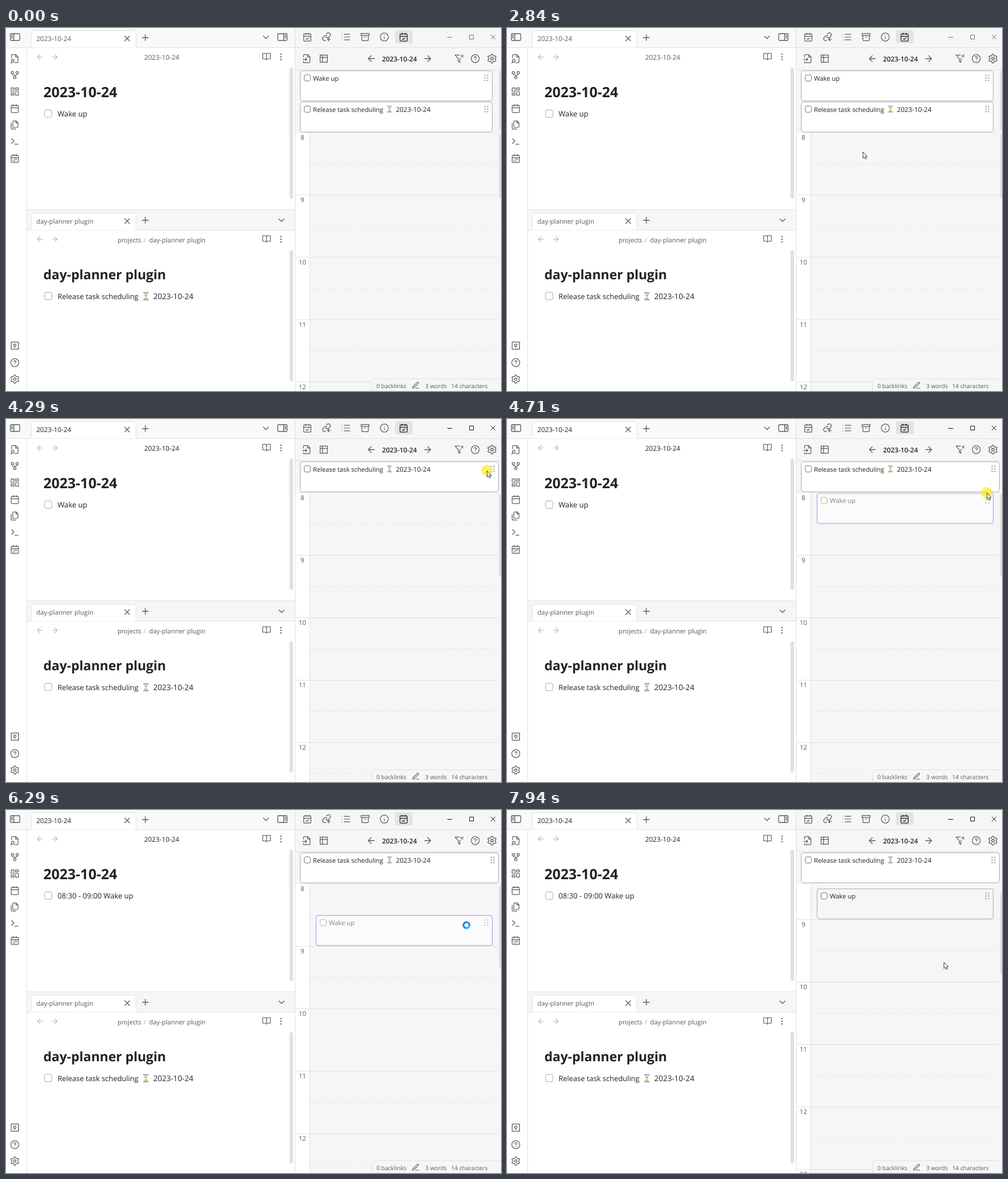
Write an HTML page that moves like this. It is 874 px wide and 640 px high and loops after 8 s.

```html
<!DOCTYPE html>
<html lang="en">
<head>
<meta charset="utf-8">
<title>Day planner</title>
<style>
html, body { margin: 0; width: 100%; height: 100%; overflow: hidden; background: #fff; }
svg { display: block; }
text { font-family: "Open Sans", "Noto Sans", sans-serif; fill: #222; text-rendering: geometricPrecision; }
text.soft { fill: #5a5a5a; }
text.faint { fill: #ababab; }
.icon { fill: none; stroke: #5a5a5a; stroke-width: 1.75; stroke-linecap: round; stroke-linejoin: round; }
.icon.dim { stroke: #b4b4b4; }
.icon.dark { stroke: #222; }
.rule { fill: none; stroke: #e0e0e0; }
.thumb { fill: #e1e1e1; }
.wake { fill: none; stroke: #707070; }
.focus .wake { stroke: #111; }
text.title { fill: #5c5c5c; }
.focus text.title { fill: #222; }
.card { fill: #fff; stroke: #ababab; }
.solid .card { fill: #f6f6f6; }
.ghost .card { fill: #fbfbfb; stroke: #a990ee; }
.ghost .body { opacity: .55; }
</style>
</head>
<body>
<svg id="stage" width="874" height="640" viewBox="0 0 874 640"></svg>
<script>
const LOOP = 8000, HOUR = 110, SNAP = HOUR / 6;

const circle = (x, y, r) => `M${x - r} ${y}a${r} ${r} 0 1 0 ${2 * r} 0a${r} ${r} 0 1 0 ${-2 * r} 0`;
const box = (x, y, w, h) => `M${x} ${y}h${w}v${h}h${-w}z`;
const gear = 'M' + Array.from({ length: 73 }, (_, i) => {
  const a = i * Math.PI / 36, r = 8.9 + 1.5 * Math.tanh(2 * Math.cos(6 * a));
  return `${(12 + r * Math.sin(a)).toFixed(2)} ${(12 - r * Math.cos(a)).toFixed(2)}`;
}).join('L') + circle(12, 12, 3);
const calendar = 'M5 4h14a2 2 0 0 1 2 2v14a2 2 0 0 1-2 2H5a2 2 0 0 1-2-2V6a2 2 0 0 1 2-2zM16 2v4M8 2v4M3 10h18';
const disc = circle(12, 12, 10);

// Icons on a 24 unit grid
const ICONS = {
  calendar, gear,
  check: calendar + 'M9 16l2 2 4-4',
  agenda: calendar + 'M7 14h.01M11 14h6M7 18h6M17 18h.01',
  search: 'M4 10V4a2 2 0 0 1 2-2h8.5L20 7.5V20a2 2 0 0 1-2 2h-6M14 2v6h6M4.5 20.5L2 23' + circle(7, 17, 3.5),
  fork: circle(12, 18, 3) + circle(6, 6, 3) + circle(18, 6, 3) + 'M18 9v1a2 2 0 0 1-2 2H8a2 2 0 0 1-2-2V9M12 12v3',
  grid: box(3, 3, 7, 9) + box(14, 3, 7, 5) + box(14, 12, 7, 9) + box(3, 16, 7, 5),
  files: 'M15.5 2H9a2 2 0 0 0-2 2v12a2 2 0 0 0 2 2h9a2 2 0 0 0 2-2V6.5zM3 7.6V20a2 2 0 0 0 2 2h9.500M15 2v5h5',
  prompt: 'M4 17l6-6-6-6M12 19h8',
  vault: box(3, 3, 18, 18) + circle(12, 11, 3) + 'M12 14v3M21 7h1.500M21 17h1.500',
  help: disc + 'M9.1 9a3 3 0 0 1 5.8 1c0 2-2.900 3-2.900 3M12 17h.01',
  info: disc + 'M12 16v-4M12 8h.01',
  book: 'M2 3h6a4 4 0 0 1 4 4v14a3 3 0 0 0-3-3H2zM22 3h-6a4 4 0 0 0-4 4v14a3 3 0 0 1 3-3h7z',
  more: circle(12, 5, 1) + circle(12, 12, 1) + circle(12, 19, 1),
  left: 'M19 12H5M12 19l-7-7 7-7',
  right: 'M5 12h14M12 5l7 7-7 7',
  close: 'M18 6L6 18M6 6l12 12',
  plus: 'M5 12h14M12 5v14',
  down: 'M6 9l6 6 6-6',
  link: 'M10 12a5 5 0 0 0 7.500.500l3-3a5 5 0 0 0-7-7l-1.700 1.700M13 9a5 5 0 0 0-6.500.500l-3 3a5 5 0 0 0 6 7.800M22 18h-7M18 14.500L14.500 18l3.500 3.500',
  list: 'M8 5h14M8 12h14M8 19h14M2 5h.01M2 12h.01M2 19h.01',
  archive: box(2, 3, 20, 5) + 'M4 8v11a2 2 0 0 0 2 2h12a2 2 0 0 0 2-2V8M10 12h4',
  input: 'M4 8V4a2 2 0 0 1 2-2h8.500L20 7.500V20a2 2 0 0 1-2 2H4v-3M14 2v6h6M2 14h10M9 11l3 3-3 3',
  table: box(3, 3, 18, 18) + 'M3 9h18M9 3v18',
  filter: 'M13 3H2l8 9.500V19l4 2v-8.500l1-1.100M22 3l-5 5M17 3l5 5',
  pencil: 'M12 20h9M16.500 3.500a2.100 2.100 0 0 1 3 3L7 19l-4 1 1-4z',
  panelLeft: 'M3 4h18a2 2 0 0 1 2 2v12a2 2 0 0 1-2 2H3a2 2 0 0 1-2-2V6a2 2 0 0 1 2-2zM9 4v16M4 8h2M4 11h2M4 14h2',
  panelRight: 'M3 4h18a2 2 0 0 1 2 2v12a2 2 0 0 1-2 2H3a2 2 0 0 1-2-2V6a2 2 0 0 1 2-2zM15 4v16M18 8h2M18 11h2M18 14h2',
};

const icon = (name, x, y, size = 17, cls = '') =>
  `<path class="icon ${cls}" d="${ICONS[name]}" transform="translate(${x - size / 2} ${y - size / 2}) scale(${size / 24})"/>`;
const text = (str, x, y, size, attrs = '') => `<text x="${x}" y="${y}" font-size="${size}" ${attrs}>${str}</text>`;
const rect = (x, y, w, h, attrs = '') => `<rect x="${x}" y="${y}" width="${w}" height="${h}" ${attrs}/>`;
const rule = (d, attrs = '') => `<path class="rule" d="${d}" ${attrs}/>`;
const SOFT = 'class="soft"', BOLD = 'font-weight="700"';

const hourglass = (x, y, k) => `<g transform="translate(${x} ${y}) scale(${k})">
  <path d="M-4-6H4V-4L1 0 4 4V6H-4V4L-1 0-4-4z" fill="#cfe3ee"/>
  <path d="M-3-3H3L0 1zM-3.500 5L0 2 3.500 5z" fill="#f2a93b"/>
  <path d="M-5-6.500H5M-5 6.500H5" stroke="#7793a3" stroke-width="1.600"/></g>`;

const checkbox = (x, y, s, color) => rect(x - s / 2, y - s / 2, s, s, `rx="3" fill="#fff" stroke="${color}"`);

const handle = (x, y) => [-4.5, 0, 4.5].map(dy => [-2.4, 2.4].map(dx =>
  `<circle cx="${x + dx}" cy="${y + dy}" r="1.300" fill="#a5a5a5"/>`).join('')).join('');

const release = (x, y) => text('Release task scheduling', x, y, 11.22) +
  hourglass(x + 135, y - 4.5, .8) + text('2023-10-24', x + 146.5, y, 11.7);

const card = (x, y, right, body) => rect(x, y, right - x, 53, 'class="card" rx="4"') +
  `<g class="body">${checkbox(x + 12.5, y + 12.5, 11, '#707070')}${body(x + 22.5, y + 17)}${handle(right - 10.5, y + 12.5)}</g>`;
const wakeUp = (x, y) => text('Wake up', x, y, 11.35);

const tab = (y, label, size, cls) =>
  `<path class="rule" style="fill:#fff" d="M37 ${y + 30}h3q4.500 0 4.500-4.500V${y + 6}q0-6 6-6h173q6 0 6 6V${y + 25.5}q0 4.500 4.500 4.500"/>` +
  text(label, 53.5, y + 18.5, size, `class="${cls}"`) +
  icon('close', 214, y + 14, 17) + icon('plus', 246, y + 12.5, 18);

const paneHeader = y => icon('left', 60, y, 15, 'dim') + icon('right', 86, y, 15, 'dim') +
  icon('book', 460, y - .5, 16) + icon('more', 485.5, y, 16);

const ribbon = { search: 54, fork: 83, grid: 112, calendar: 142, files: 171, prompt: 200, agenda: 230, vault: 560, help: 590, gear: 619 };

const leftSide =
  rect(0, 0, 510, 34, 'fill="#f9f9f9"') + rect(37, 321, 473, 35, 'fill="#f6f6f6"') +
  rule('M0 34.500H510M36.500 34V640M37 320.500H510M37 356.500H510') +
  icon('panelLeft', 16, 16, 18) + icon('down', 459, 16.5, 18) + icon('panelRight', 488, 16, 18) +
  Object.entries(ribbon).map(([name, y]) => icon(name, 15.5, y)).join('') +
  tab(4.5, '2023-10-24', 11.8, 'title') + paneHeader(51) +
  text('2023-10-24', 244, 55.5, 11.85, 'class="title"') +
  text('2023-10-24', 66, 121.5, 25, BOLD) +
  checkbox(74.5, 151, 13, '#ababab') + text('', 91, 156, 13.1, 'id="entry"') +
  rect(500.5, 70, 6.5, 231, 'class="thumb" rx="2"') +
  tab(326.5, 'day-planner plugin', 11.46, 'soft') + icon('down', 486.5, 339, 18) + paneHeader(372.5) +
  text('projects', 197, 378, 11.25, SOFT) + text('/', 243, 378, 11.4, 'class="faint"') +
  text('day-planner plugin', 252.5, 378, 11.4, SOFT) +
  text('day-planner plugin', 66, 443, 23, BOLD) +
  checkbox(74.5, 472.5, 13, '#ababab') + text('Release task scheduling', 91, 477.5, 12.95) +
  hourglass(247, 473, .95) + text('2023-10-24', 260, 477.5, 13.55) +
  rect(500.5, 392, 6.5, 231, 'class="thumb" rx="2"');

const toolbar = ['check', 'link', 'list', 'archive', 'info'].map((name, i) => icon(name, 532 + 34 * i, 16)).join('');

const rightSide =
  rect(510, 0, 364, 640, 'fill="#f6f6f6"') + rule('M511 34.500H874M511 73.500H874') +
  toolbar + rect(687, 4, 31, 23, 'rx="4" fill="#e3e3e3"') + icon('check', 702, 16, 17, 'dark') +
  '<path class="wake" d="M779 16.500h9M818.500 12.500h7v7h-7zM856 12l8 8M864 12l-8 8"/>' +
  icon('input', 531, 54) + icon('table', 561, 54) + icon('left', 645, 54, 18) + icon('right', 744.5, 54, 18) +
  text('2023-10-24', 664, 58.5, 11.8, 'font-weight="600"') +
  icon('filter', 800, 54) + icon('help', 828.5, 54) + icon('gear', 858, 54, 18) +
  `<g id="before">${card(519.5, 75.5, 858.5, wakeUp)}${card(519.5, 130.5, 858.5, release)}${rect(870.5, 76, 4, 104, 'class="thumb" rx="1"')}</g>` +
  `<g id="after">${card(519.5, 75.5, 869.5, release)}</g>`;

const hours = [8, 9, 10, 11, 12, 13].map((h, i) => {
  const y = i * HOUR;
  return rule(`M511 ${y}H869`) + rule(`M537 ${y + HOUR / 2}H869`, 'stroke-dasharray="2 2"') +
    text(h, 523.3, y + 12.5, 11.5, 'class="soft" text-anchor="middle"');
}).join('');

const lane = `<svg id="lane" width="874" height="640">${rect(511, 0, 25.5, 640, 'fill="#fff"')}
  <g id="scroll">${hours}<g id="block">${card(547.5, .5, 858.5, wakeUp)}</g></g>
  ${rule('M536.500 0V640')}${rect(870.5, 2.5, 4, 144, 'class="thumb" id="thumb" rx="1"')}</svg>`;

const statusBar =
  '<path class="rule" style="fill:#f6f6f6" d="M645.500 641V626.500q0-8 8-8H875V641z"/>' +
  text('0 backlinks', 654, 634.5, 10.35, SOFT) + icon('pencil', 723.5, 630, 15) +
  text('3 words', 740, 634.5, 10.4, SOFT) + text('14 characters', 786, 634.5, 10.27, SOFT);

const pointer = `<g id="pointer">
  <circle id="press" r="10" fill="#ffec20" fill-opacity=".7"/>
  <path id="arrow" d="M.5.5V11.500L3 9.200 4.700 13 6.600 12.200 5 8.500H8.200z" fill="#fff" stroke="#222" stroke-width=".9"/>
  <g id="busy" fill="none" stroke-width="3.300"><circle r="5.200" fill="#fff" stroke="#168be8"/>
  <path d="M0-5.200A5.200 5.200 0 0 1 5.200 0" stroke="#4db4f8"/></g></g>`;

const stage = document.getElementById('stage');
stage.innerHTML = leftSide + rightSide + lane + rule('M510.500 0V640') + statusBar + pointer;
const $ = id => document.getElementById(id);
const show = (id, on) => $(id).setAttribute('display', on ? 'inline' : 'none');
const move = (id, x, y) => $(id).setAttribute('transform', `translate(${x} ${y})`);

// Pointer moves: first step, last step, number of steps, destination
const MOVES = [
  [330, 330, 1, 815, 616], [395, 520, 3, 623, 227], [850, 850, 1, 622, 226],
  [2840, 2840, 1, 628, 218], [2916, 3600, 10, 855, 125], [3670, 4060, 6, 852, 92],
  [4290, 4290, 1, 849, 91], [4360, 4710, 6, 847, 130], [4780, 5060, 5, 842, 175],
  [5140, 5290, 3, 836, 192], [5600, 6290, 10, 813, 203], [7360, 7640, 5, 771, 268],
];

function pointerAt(t) {
  let x = 815, y = 616;
  for (const [start, end, steps, toX, toY] of MOVES) {
    if (t < start) break;
    const step = t >= end ? steps : 1 + Math.floor((t - start) / (end - start) * (steps - 1));
    const p = step / steps, ease = p * p * (3 - 2 * p);
    x += (toX - x) * ease;
    y += (toY - y) * ease;
  }
  return [x, y];
}

function draw(t) {
  const [x, y] = pointerAt(t);
  const dragging = t >= 4290, dropped = t >= 5600, saved = t >= 6430;
  const busy = t >= 5670 && t < 6680;
  const top = dragging ? 130.5 : 184;
  const scroll = t < 7850 ? 0 : t < 7940 ? 17 : 47;
  const slot = dropped ? 3 : Math.floor((y - 129.9) / SNAP);

  stage.classList.toggle('focus', dragging);
  show('before', !dragging);
  show('after', dragging);
  $('entry').textContent = t < 6130 ? 'Wake up' : '08:30 - 09:00 Wake up';

  $('lane').setAttribute('y', top);
  move('scroll', 0, -scroll);
  move('thumb', 0, scroll * .28);
  $('thumb').setAttribute('height', dragging ? 144 : 113);
  show('block', dragging);
  move('block', 0, slot * SNAP);
  $('block').setAttribute('class', saved ? 'solid' : 'ghost');

  show('pointer', t >= 330);
  move('pointer', x, y);
  show('press', t >= 4060 && !dropped);
  show('arrow', !busy);
  show('busy', busy);
  $('busy').setAttribute('transform', `rotate(${t * .36 % 360})`);
}

const began = performance.now();
function tick() {
  draw((performance.now() - began) % LOOP);
  requestAnimationFrame(tick);
}
tick();
</script>
</body>
</html>
```
